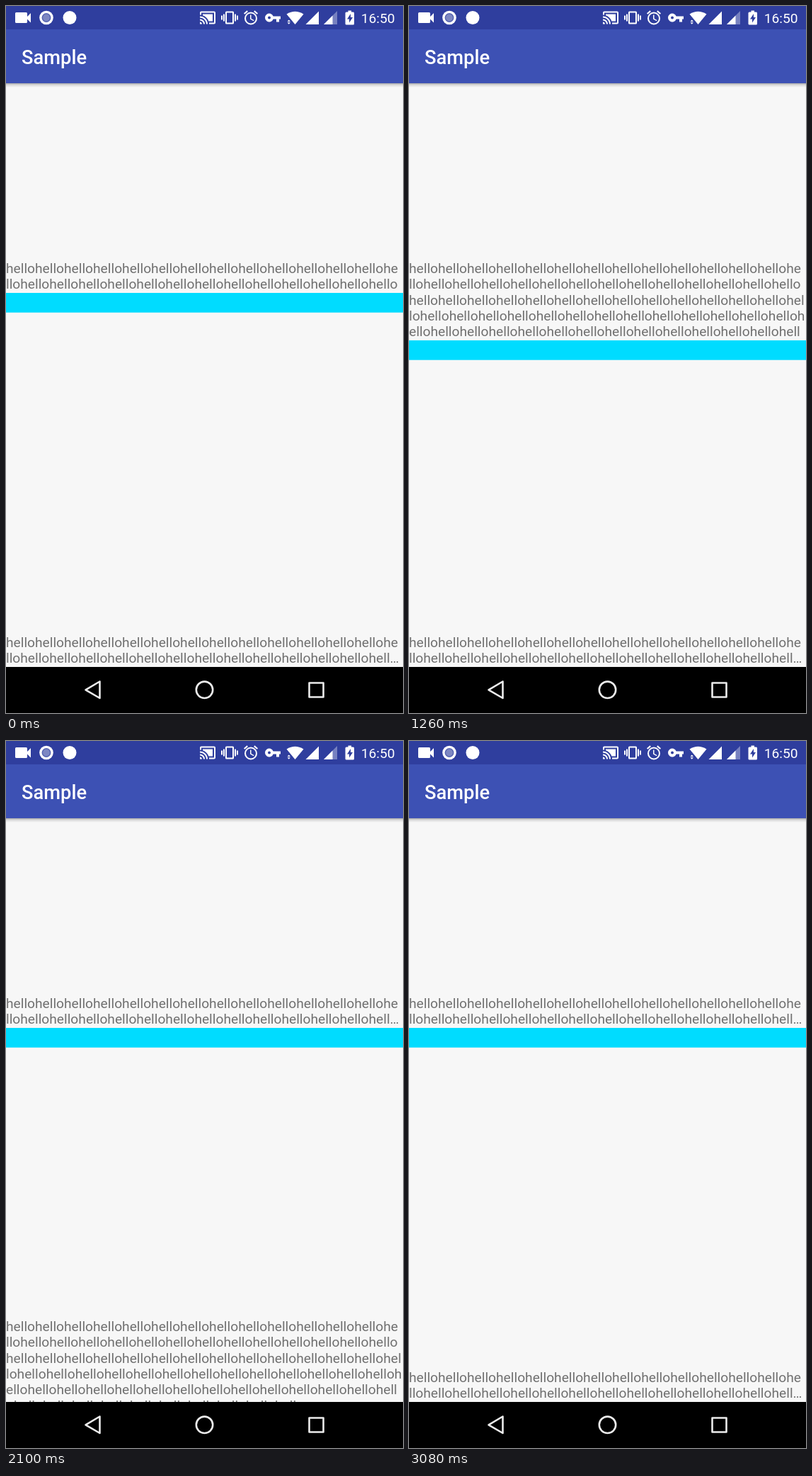
An HTML page for the animation above (3220 ms loop, 561 by 998 pixels).

```html
<!DOCTYPE html>
<html lang="en">
<head>
<meta charset="utf-8">
<title>Expandable text</title>
<style>
  html, body { margin: 0; width: 100%; height: 100%; overflow: hidden; background: #f7f7f7; }
  svg { display: block; }
  text { font-family: Roboto, sans-serif; }
  .body { font-size: 19.2px; fill: #707070; }
  .title { font-size: 27.3px; font-weight: 500; }
  .clock { font-size: 19.2px; }
  .nav { fill: none; stroke: #ececec; stroke-width: 2.6; stroke-linejoin: round; }
</style>
</head>
<body>
<svg width="561" height="998" viewBox="0 0 561 998">
  <defs>
    <linearGradient id="shade" x2="0" y2="1">
      <stop offset="0" stop-opacity=".32"/>
      <stop offset=".4" stop-opacity=".12"/>
      <stop offset="1" stop-opacity="0"/>
    </linearGradient>
  </defs>
  <rect width="561" height="998" fill="#f7f7f7"/>

  <!-- expandable paragraphs -->
  <svg id="upper" y="357" width="561" height="48"><text class="body"></text></svg>
  <rect id="bar" y="405" width="561" height="27.7" fill="#00dcff"/>
  <svg id="lower" y="885" width="561" height="48"><text class="body"></text></svg>

  <!-- app bar -->
  <rect y="109" width="561" height="6" fill="url(#shade)"/>
  <rect width="561" height="109" fill="#3d51b4"/>
  <rect width="561" height="33" fill="#2f3e9e"/>
  <g fill="#fff">
    <text class="title" x="22" y="81.5">Sample</text>

    <!-- status icons -->
    <path d="M14.5 9h14q1.5 0 1.5 1.5V15l5-5v13.500l-5-5V22.500q0 1.500-1.500 1.500h-14q-1.500 0-1.500-1.500v-12q0-1.500 1.500-1.500z"/>
    <circle cx="57" cy="16.500" r="9.800"/>
    <circle cx="57" cy="16.500" r="5.700" fill="#7d87c2" stroke="#5664b1" stroke-width="1.500"/>
    <circle cx="90" cy="16.500" r="9.500"/>
    <path transform="translate(273 4.500)" d="M1 18v3h3c0-1.660-1.340-3-3-3zm0-4v2c2.760 0 5 2.240 5 5h2c0-3.870-3.130-7-7-7zm18-7H5v1.630c3.960 1.280 7.090 4.410 8.370 8.370H19V7zM1 10v2c4.970 0 9 4.030 9 9h2c0-6.080-4.930-11-11-11zm20-7H3c-1.100 0-2 .9-2 2v3h2V5h18v14h-7v2h7c1.100 0 2-.9 2-2V5c0-1.100-.9-2-2-2z"/>
    <path transform="translate(304 4.500)" d="M0 15h2V9H0zm3 2h2V7H3zm19-8v6h2V9zm-3 8h2V7h-2zM16.500 3h-9Q6 3 6 4.500v15Q6 21 7.500 21h9q1.500 0 1.500-1.500v-15Q18 3 16.500 3zM16 19H8V5h8z"/>
    <path transform="translate(334 4.500)" d="M22 5.720l-4.600-3.860-1.290 1.530 4.600 3.860zM7.880 3.390L6.600 1.860 2 5.710l1.290 1.530zM12.500 8H11v6l4.750 2.850.75-1.230-4-2.370z"/>
    <circle cx="346" cy="17.500" r="8" fill="none" stroke="#fff" stroke-width="2"/>
    <path transform="translate(365 4.500)" fill-rule="evenodd" d="M12.650 10A6 6 0 1 0 12.650 14H17v4h4v-4h2v-4zM7 14a2 2 0 1 1 0-4 2 2 0 0 1 0 4z"/>
    <path d="M396.500 11.500Q408.500 4 420.500 11.500L408.500 26z"/>
    <path d="M397.500 22l2.200-2.500 2.200 2.500zM397.500 23.300h4.400l-2.200 2.500z"/>
    <path d="M423.500 26h18.500V7.500z"/>
    <path d="M449 26h19V7z" opacity=".35"/>
    <path d="M449 26h12.500V13.500z"/>
    <path fill-rule="evenodd" d="M483.500 6.500h4.500v2h2.500q1.500 0 1.500 1.500v15q0 1.500-1.500 1.500h-9.500q-1.500 0-1.500-1.500v-15q0-1.500 1.500-1.500h2.500zM487 11l-5 7.500h3v5l5-7.500h-3z"/>
    <text class="clock" x="501.800" y="24">16:50</text>
  </g>

  <!-- navigation bar -->
  <rect y="933" width="561" height="65" fill="#000"/>
  <g class="nav">
    <path d="M112.500 965.300L132.500 953.500V977z"/>
    <circle cx="280.500" cy="965.300" r="11.700"/>
    <rect x="428.500" y="955.500" width="20" height="20"/>
  </g>
</svg>
<script>
  const TICK = 140, LOOP = 3220, CLOSED = 48, GROWTH = 88;
  const LEADING = 22.34, BASELINE = 20.1;
  const words = 'hello'.repeat(78);
  const breaks = [0, 67, 135, 203, 271, 339, 390];
  const $ = id => document.getElementById(id);

  // [tick, openness phase]; null is closed and ellipsized
  const upperKeys = [[0, 0], [1, .19], [3, .56], [4, .92], [6, 1], [9, .675], [10, .31], [11, null]];
  const lowerKeys = [[0, null], [13, 0], [14, .36], [15, .72], [16, 1], [20, .675], [21, .31], [22, null]];

  const ease = t => .5 - Math.cos(Math.PI * t) / 2;
  const phaseAt = (keys, tick) => keys.filter(k => k[0] <= tick).pop()[1];

  function fill(box) {
    const text = box.querySelector('text');
    for (let i = 0; i < 6; i++) {
      const line = document.createElementNS('http://www.w3.org/2000/svg', 'tspan');
      line.setAttribute('x', 0);
      line.setAttribute('y', BASELINE + i * LEADING);
      line.textContent = words.slice(breaks[i], breaks[i + 1]);
      text.append(line);
    }
  }

  function pose(box, phase) {
    const grown = GROWTH * ease(phase ?? 0);
    const lines = box.querySelectorAll('tspan');
    const second = words.slice(breaks[1], breaks[2]);
    lines[1].textContent = phase === null ? second.slice(0, -1) + '…' : second;
    box.setAttribute('height', CLOSED + grown);
    return grown;
  }

  const upper = $('upper'), lower = $('lower'), bar = $('bar');
  let shown = -1;

  function draw() {
    const tick = Math.floor(performance.now() % LOOP / TICK);
    if (tick !== shown) {
      shown = tick;
      bar.setAttribute('y', 405 + pose(upper, phaseAt(upperKeys, tick)));
      lower.setAttribute('y', 885 - pose(lower, phaseAt(lowerKeys, tick)));
    }
    requestAnimationFrame(draw);
  }

  fill(upper);
  fill(lower);
  draw();
</script>
</body>
</html>
```
